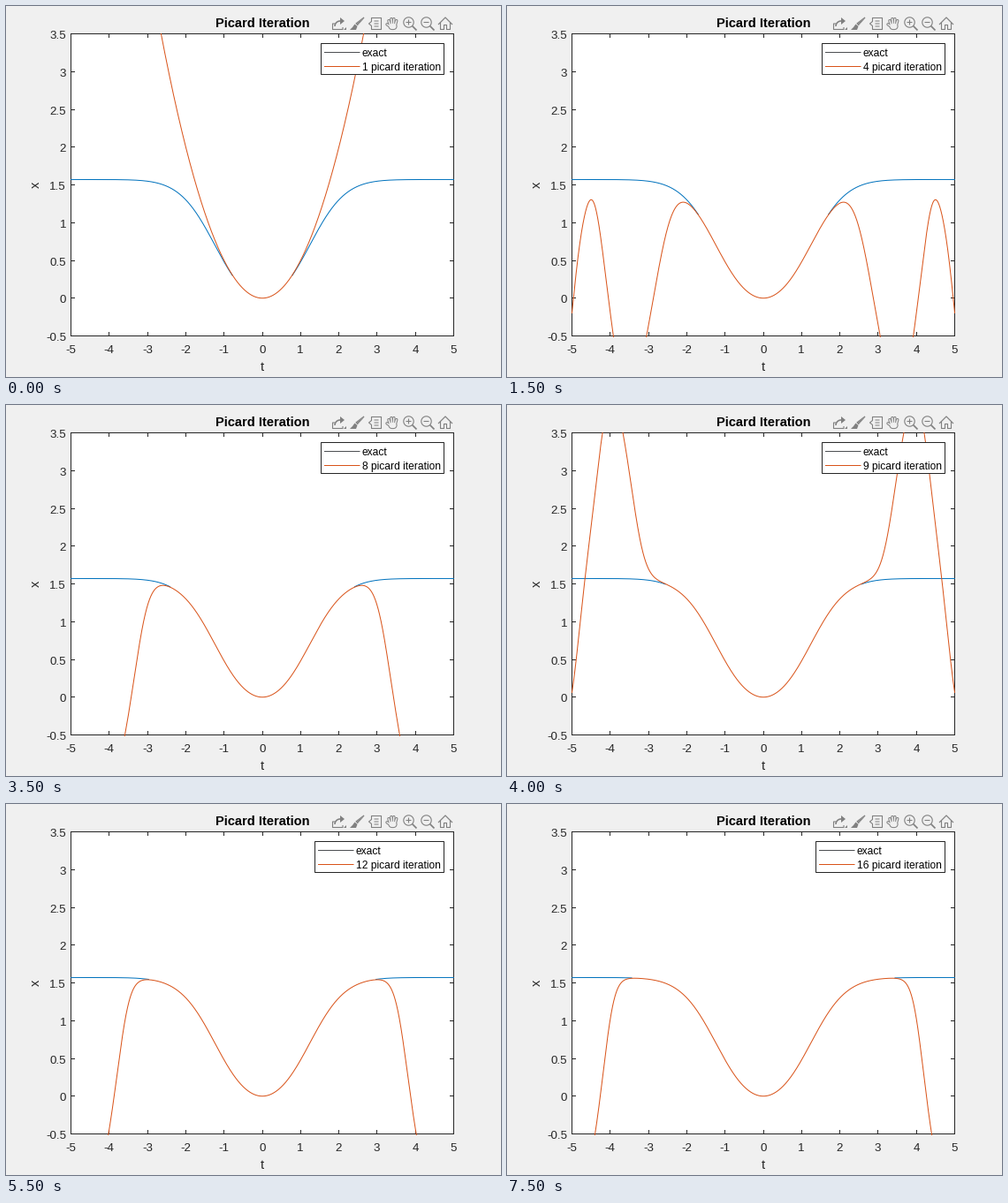
These frames come from a looping animation (560x420 px, 8 s). A matplotlib script:

```python
import numpy as np
import matplotlib.pyplot as plt
from matplotlib.animation import FuncAnimation
from matplotlib.patches import Rectangle

W, H, DPI = 560, 420, 80
PX = 72 / DPI                     # one pixel in points
FRAMES, STEP_MS = 16, 500
LEFT, RIGHT, TOP, BOTTOM = 73.5, 506.5, 31.5, 373.5
KEY_RIGHT, KEY_TOP, KEY_BOTTOM = 495.5, 42.5, 77.5
PAPER, INK, ICON = "#f0f0f0", "#262626", "#808080"
BLUE, ORANGE, KEY = "#0072bd", "#d95319", "#4c4f52"

plt.rcParams["font.family"] = "Liberation Sans"
fig = plt.figure(figsize=(W / DPI, H / DPI), dpi=DPI, facecolor=PAPER)
ax = fig.add_axes([0, 0, 1, 1])
ax.set_xlim(0, W)
ax.set_ylim(H, 0)
ax.axis("off")


def px(t):
    return LEFT + (t + 5) / 10 * (RIGHT - LEFT)


def py(x):
    return BOTTOM - (x + 0.5) / 4 * (BOTTOM - TOP)


def line(xs, ys, color=INK, width=1.0, z=2, **kw):
    return ax.plot(xs, ys, color=color, lw=width * PX, zorder=z,
                   snap=False, **kw)[0]


def text(x, y, s, size=13.33, color=INK, z=2, **kw):
    kw.setdefault("va", "baseline")
    return ax.text(x, y, s, fontsize=size * PX, color=color, zorder=z, **kw)


def box(x0, y0, x1, y1, z):
    return ax.add_patch(Rectangle((x0, y0), x1 - x0, y1 - y0, fc="white",
                                  ec=INK, lw=PX, zorder=z, snap=False))


def pixel(v):
    return np.floor(v) + 0.5


def draw_axes():
    box(LEFT, TOP, RIGHT, BOTTOM, 1)
    for k in range(-5, 6):
        x = pixel(px(k))
        line([x, x], [BOTTOM, BOTTOM - 4])
        line([x, x], [TOP, TOP + 4])
        text(x - 0.3, 393, str(k), ha="center")
    for k in range(-1, 8):
        y = pixel(py(k / 2))
        line([LEFT, LEFT + 4], [y, y])
        line([RIGHT, RIGHT - 4], [y, y])
        text(68, y + 5.5, f"{k / 2:g}", ha="right")
    text(290, 24, "Picard Iteration", 14.67, "black", ha="center",
         weight="bold")
    text(290, 413, "t", 14.67, ha="center")
    text(41, 202, "x", 14.67, rotation=90, ha="right", va="center")


def stroke(xs, ys, width=1.1, color=ICON):
    line(xs, ys, color, width, solid_capstyle="butt")


def arc(cx, cy, rx, ry, start=0, end=360):
    a = np.radians(np.linspace(start, end, 40))
    return cx + rx * np.cos(a), cy + ry * np.sin(a)


def share(cx, cy):
    stroke(cx + np.array([-4, -6.5, -6.5, 5, 5]),
           cy + np.array([0, 0, 6.5, 6.5, 4]))
    stroke(*arc(cx + 2, cy + 3, 6, 6, 180, 270), width=1.6)
    ax.fill(cx + np.array([2, 7, 2]), cy + np.array([-7, -3, 1]), fc=ICON)
    ax.fill(cx + np.array([6, 9, 9]), cy + np.array([7, 7, 4]), fc=ICON)


def brush(cx, cy):
    s = np.linspace(0, 1, 8)
    for a, b in zip(s[:-1], s[1:]):
        stroke(cx + 8 - 8.5 * np.array([a, b]),
               cy - 7 + 8 * np.array([a, b]), 1.5 + 2.3 * a)
    ax.fill(cx + np.array([-2.5, 0.5, -1, -8, -5]),
            cy + np.array([0.5, 3, 7, 7, 4]), fc=ICON)


def data_tip(cx, cy):
    stroke(cx + np.array([-4, -4, 7, 7, -4, -4, -7, -4]),
           cy + np.array([-2.5, -6.5, -6.5, 6.5, 6.5, 2.5, 0, -2.5]))
    for dy in (-3, 0, 3):
        stroke([cx - 1, cx + 4], [cy + dy, cy + dy], 1)


def hand(cx, cy):
    # a grey silhouette, then a thinner one in the paper colour
    for color, inset in ((ICON, 0), (PAPER, 2)):
        def limb(x0, y0, x1, y1, w):
            line([cx + x0, cx + x1], [cy + y0, cy + y1], color, w - inset,
                 solid_capstyle="round")
        for k in range(4):
            limb(1.9 * k - 2.5, 2, 2.9 * k - 4, (k - 1.5) ** 2 - 5.6, 3.5)
        limb(-1, 4, -6, 0.8, 3.4)
        limb(-0.5, 3, 1.5, 3, 8.2)


def zoom(cx, cy, plus):
    stroke(*arc(cx, cy, 5.7, 5.7))
    stroke([cx + 4.2, cx + 9], [cy + 4.2, cy + 9], 1.7)
    stroke([cx - 3, cx + 3], [cy, cy])
    if plus:
        stroke([cx, cx], [cy - 3, cy + 3])


def home(cx, cy):
    x = np.linspace(-8, 8, 3)
    stroke(cx + x, cy - 7 + np.abs(x), 1.2)
    for side in (-1, 1):
        stroke(cx + side * np.array([5.5, 5.5, 1.5, 1.5, 0]),
               cy + np.array([-1, 6.5, 6.5, 1.5, 1.5]))


def draw_toolbar():
    share(376, 20)
    brush(397, 20)
    data_tip(417.5, 20)
    hand(437, 20)
    zoom(455.5, 18.5, True)
    zoom(475.5, 18.5, False)
    home(497, 20)


def picard(count, t):
    """Iterates of x' = t cos x, x(0) = 0, starting from x = 0."""
    x = np.zeros_like(t)
    for _ in range(count):
        f = t * np.cos(x)
        area = (f[1:] + f[:-1]) / 2 * np.diff(t)
        x = np.concatenate([[0], np.cumsum(area)])
        yield py(np.concatenate([x[:0:-1], x]))


half = np.linspace(0, 5, 1501)
full = np.concatenate([-half[:0:-1], half])
curves = list(picard(FRAMES, half))
exact = py(2 * np.arctan(np.tanh(full ** 2 / 4)))

draw_axes()
draw_toolbar()
solution = line(px(full), exact, BLUE, z=3)
curve = line(px(full), curves[0], ORANGE, z=4)
curve.set_clip_path(Rectangle((LEFT - 1, TOP - 1), RIGHT - LEFT + 2,
                              BOTTOM - TOP + 2, transform=ax.transData))

legend = box(356.5, KEY_TOP, KEY_RIGHT, KEY_BOTTOM, 5)
keys = [line([], [], c, z=6) for c in (KEY, ORANGE)]
labels = [text(403, y, "exact", 12, "black", z=6) for y in (57, 73)]


def update(i):
    n = i + 1
    x = 356.5 if n < 10 else 349.5
    curve.set_ydata(curves[i])
    # the iterate fully covers the solution where both coincide
    covered = np.abs(curves[i] - exact) < 0.4
    solution.set_ydata(np.where(covered, np.nan, exact))
    legend.set_x(x)
    legend.set_width(KEY_RIGHT - x)
    for key, label, y in zip(keys, labels, (52.5, 68.5)):
        key.set_data([x + 4, x + 43.5], [y, y])
        label.set_x(x + 46.3)
    labels[1].set_text(f"{n} picard iteration")
    return [solution, curve, legend, *keys, *labels]


anim = FuncAnimation(fig, update, frames=FRAMES, interval=STEP_MS,
                     init_func=lambda: update(0), repeat=True,
                     repeat_delay=0, blit=False)
plt.show()
```
